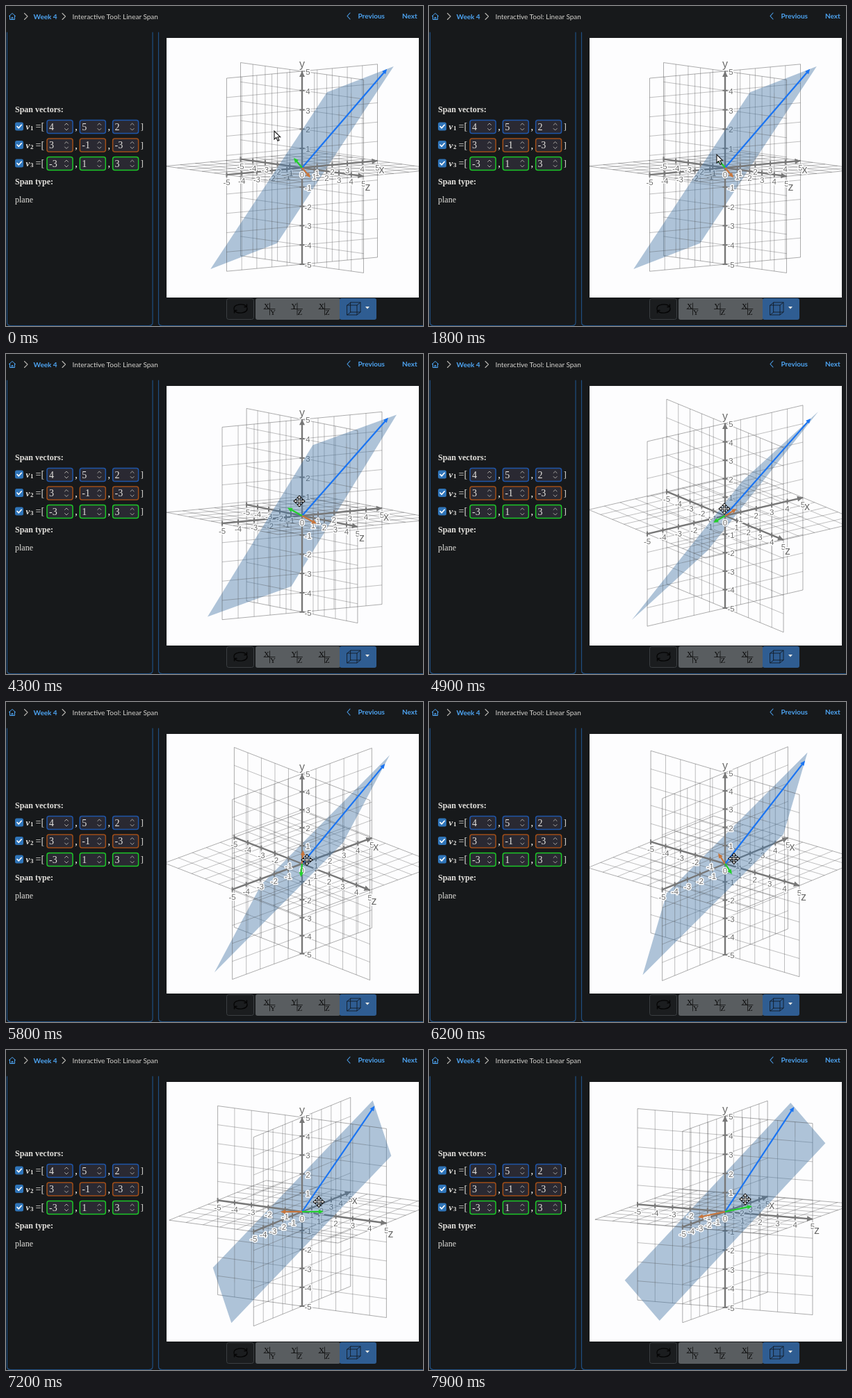
An HTML page with a canvas that plays this animation: 600x461 px, repeating every 8 s.

```html
<!DOCTYPE html>
<html lang="en">
<head>
<meta charset="utf-8">
<title>Linear Span</title>
<style>
  html, body { margin: 0; width: 100%; height: 100%; overflow: hidden; background: #17191b; }
  svg, canvas { position: absolute; left: 0; top: 0; width: 600px; height: 461px; }
  .nav { font: 10px Lato, sans-serif; fill: #d4d2ce; }
  .link { fill: #4da3f0; }
  .bold { font-weight: 700; }
  .serif { font: 12px "Liberation Serif", serif; fill: #e4e2de; }
  .head { font-weight: 700; }
  .var { font-style: italic; font-weight: 700; font-size: 13px; }
  .icon { font: 11px "Liberation Serif", serif; fill: #0c0c0c; }
  .line { fill: none; stroke-linecap: round; stroke-linejoin: round; }
</style>
</head>
<body>
<svg viewBox="0 0 600 461">
  <g class="line" stroke="#1f4f82" stroke-width="1.2">
    <path d="M1.500 38V455.500q0 5 5 5H206q5 0 5-5V38"/>
    <path d="M219.500 38V455.500q0 5 5 5H600"/>
  </g>
  <path class="line" stroke="#4da3f0" d="M4.500 14.500L9 10.500l4.500 4M5.500 14v5.500h7V14M8 19.500v-3h2v3"/>
  <g class="line" stroke-width="1.1">
    <path stroke="#b5b3af" d="M26.500 10.500l4.500 4.500-4.500 4.500M81 10.500l4.500 4.500-4.500 4.500"/>
    <path stroke="#4da3f0" d="M495 10l-4 4.500 4 4.500"/>
  </g>
  <text class="nav link bold" x="39.500" y="18.500">Week 4</text>
  <text class="nav" x="95.500" y="18.500">Interactive Tool: Linear Span</text>
  <text class="nav link bold" x="506.500" y="18">Previous</text>
  <text class="nav link bold" x="570" y="18">Next</text>

  <text class="serif head" x="13" y="153">Span vectors:</text>
  <text class="serif head" x="13" y="257">Span type:</text>
  <text class="serif" x="13" y="283">plane</text>
  <g id="rows"></g>

  <rect x="317.500" y="421.500" width="39" height="30" rx="3" fill="#1b1d1f" stroke="#3b3f42"/>
  <g class="line" stroke="#050505" stroke-width="1.4">
    <path d="M328 437c-1-8 14-9 18-4M347 435c1 8-14 9-18 4M346.500 430v3.500h-3.500M328.500 442v-3.500h3.500"/>
  </g>
  <rect x="359" y="421" width="122" height="31" rx="3" fill="#595d60"/>
  <g id="views"></g>
  <rect x="480" y="421" width="53" height="31" rx="3" fill="#2f5d92"/>
  <path class="line" stroke="#131b26" stroke-width=".9" d="M491 431h14v14h-14zM496 427h14v14h-14zM491 431l5-4M505 431l5-4M491 445l5-4M505 445l5-4"/>
  <path fill="#e8e6e3" d="M517 433h6l-3 3.500z"/>
</svg>
<canvas id="stage" width="600" height="461"></canvas>

<script>
const LOOP = 8000, STEP = 100;
const SCALE = 140 / 5, CX = 426, CY = 233;
const VECTORS = [
  { v: [4, 5, 2], color: '#1a74f2', edge: '#1f55a8' },
  { v: [3, -1, -3], color: '#c8763c', edge: '#a04e18' },
  { v: [-3, 1, 3], color: '#22cf2c', edge: '#1cc728' }
];
const NORMAL = [-13, 18, -19];
const GRID = 'rgba(70,70,70,.34)', GRID_EDGE = 'rgba(70,70,70,.44)', AXIS = '#777';

// time, azimuth, elevation in degrees
const POSE = [
  [0, 39.2, 6.55], [3850, 39.2, 6.55], [4300, 34.8, 7.95], [4900, 36.9, 18.1],
  [5800, 44.2, 22.3], [6700, 56.6, 16.4], [7900, 64.1, 10]
];
// time, x, y of the pointer
const POINTER = [
  [0, 386, 180], [900, 398, 196], [1800, 414, 214], [2300, 416, 236], [2700, 418, 246],
  [2800, 414, 232], [2900, 414, 232], [3200, 444, 236], [3500, 434, 191], [3800, 426.5, 210.5],
  [4300, 422, 212], [4900, 425, 223], [5800, 433, 227.5], [6700, 446, 221.5], [7900, 455, 215]
];
const DRAG_START = 3850;

// Monotone cubic interpolation of column k
function sample(keys, t, k) {
  let i = 0;
  while (i < keys.length - 2 && t >= keys[i + 1][0]) i++;
  const slope = j => j < 0 || j > keys.length - 2 ? 0
    : (keys[j + 1][k] - keys[j][k]) / (keys[j + 1][0] - keys[j][0]);
  const tangent = j => {
    const a = slope(j - 1), b = slope(j);
    if (j === keys.length - 1) return a;
    return a * b > 0 ? 2 * a * b / (a + b) : 0;
  };
  const h = keys[i + 1][0] - keys[i][0];
  const u = Math.min(1, (t - keys[i][0]) / h), w = 1 - u;
  return keys[i][k] * w * w * (1 + 2 * u) + keys[i + 1][k] * u * u * (3 - 2 * u)
    + h * u * w * (w * tangent(i) - u * tangent(i + 1));
}

// Side panel rows and view buttons
document.getElementById('rows').innerHTML = VECTORS.map(({ v, edge }, r) => {
  const y = 174 + r * 26.5;
  const boxes = v.map((n, i) => {
    const x = 59 + i * 47.3;
    return `<rect x="${x}" y="${y - 9.5}" width="37" height="19" rx="3" fill="#2a2932" stroke="${edge}" stroke-width="1.5"/>
      <text class="serif" x="${x + 3}" y="${y + 4.5}" style="font-size:14px">${n}</text>
      <path class="line" stroke="#aaa8a4" d="M${x + 25.5} ${y - 2.5}l2.500-2.500 2.500 2.500m-5 5l2.500 2.500 2.500-2.500"/>
      <text class="serif head" x="${x + 40.5}" y="${y + 5}">${i < 2 ? ',' : ''}</text>`;
  }).join('');
  return `<rect x="13" y="${y - 6.5}" width="12" height="12" rx="2.500" fill="#2f74b8"/>
    <path class="line" stroke="#fff" stroke-width="1.7" d="M16 ${y - .5}l2.300 2.300 4-4.500"/>
    <text class="serif var" x="28.500" y="${y + 4}">v</text>
    <text class="serif head" x="35" y="${y + 5}" style="font-size:9px">${r + 1}</text>
    <text class="serif" x="42.500" y="${y + 4}" style="font-size:14px">=[</text>${boxes}
    <text class="serif" x="193.500" y="${y + 4}" style="font-size:13px">]</text>`;
}).join('');
document.getElementById('views').innerHTML = ['XY', 'YZ', 'XZ'].map((s, i) => {
  const x = 371 + i * 39.5;
  return `<text class="icon" x="${x}" y="436">${s[0]}</text><text class="icon" x="${x + 9}" y="445">${s[1]}</text>
    <path class="line" stroke="#111" stroke-width=".8" d="M${x} 436.500h16M${x + 8.5} 428v17"/>`;
}).join('');

const ctx = document.getElementById('stage').getContext('2d');
let ca, sa, ce, se, facing;

function setView(a, e) {
  a *= Math.PI / 180;
  e *= Math.PI / 180;
  [ca, sa, ce, se] = [Math.cos(a), Math.sin(a), Math.cos(e), Math.sin(e)];
  facing = Math.sign(dot(NORMAL, [-sa * ce, se, ca * ce])) || 1;
}
const dot = (p, q) => p[0] * q[0] + p[1] * q[1] + p[2] * q[2];
const side = p => dot(NORMAL, p) * facing;
const project = ([x, y, z]) => [
  CX + SCALE * (x * ca + z * sa),
  CY + SCALE * ((z * ca - x * sa) * se - y * ce)
];
const point = (axis, n) => [0, 1, 2].map(i => i === axis ? n : 0);

function line(a, b, color, width) {
  ctx.strokeStyle = color;
  ctx.lineWidth = width;
  ctx.beginPath();
  ctx.moveTo(...a);
  ctx.lineTo(...b);
  ctx.stroke();
}

// Part of the segment in front of (dir 1) or behind (dir -1) the span
function segment(p, q, dir, color, width) {
  const f = side(p) * dir, g = side(q) * dir;
  if (f < 0 && g < 0 || (dir < 0 && f === 0 && g === 0)) return;
  const cut = p.map((c, i) => c + (q[i] - c) * f / (f - g));
  line(project(f < 0 ? cut : p), project(g < 0 ? cut : q), color, width);
}

function head(from, to, color, len, half) {
  const dx = to[0] - from[0], dy = to[1] - from[1], d = Math.hypot(dx, dy) || 1;
  const ux = dx / d, uy = dy / d, bx = to[0] - ux * len, by = to[1] - uy * len;
  ctx.fillStyle = color;
  ctx.beginPath();
  ctx.moveTo(...to);
  ctx.lineTo(bx - uy * half, by + ux * half);
  ctx.lineTo(bx + uy * half, by - ux * half);
  ctx.fill();
}

function label(text, x, y, size = 11.5) {
  ctx.font = `${size}px "Liberation Sans", Arial, sans-serif`;
  ctx.strokeStyle = '#fff';
  ctx.lineWidth = 3;
  ctx.strokeText(text, x, y);
  ctx.fillStyle = '#6c6c6c';
  ctx.fillText(text, x, y);
}

function drawGrids(dir) {
  for (const [u, v] of [[0, 1], [1, 2], [0, 2]]) {
    for (let n = -5; n <= 5; n++) {
      for (const [i, j] of [[u, v], [v, u]]) {
        const p = point(i, n), q = point(i, n);
        p[j] = -5;
        q[j] = 5;
        segment(p, q, dir, Math.abs(n) === 5 ? GRID_EDGE : GRID, 1);
      }
    }
  }
}

function drawAxes(dir) {
  const shown = p => side(p) * dir > 0;
  for (let k = 0; k < 3; k++) {
    segment(point(k, -5), point(k, 5), dir, AXIS, 2.4);
    for (let n = -5; n < 5; n++) {
      const p = point(k, n);
      if (!n || !shown(p)) continue;
      const [x, y] = project(p);
      if (k === 1) line([x - 3.5, y], [x + 3.5, y], AXIS, 2);
      else line([x, y - 3.5], [x, y + 3.5], AXIS, 2);
    }
    if (shown(point(k, 5))) head([CX, CY], project(point(k, 5)), AXIS, 8, 4);
  }
  for (let k = 0; k < 3; k++) {
    for (let n = -5; n <= 5; n++) {
      const p = point(k, n);
      if (!n || !shown(p)) continue;
      const [x, y] = project(p);
      if (k === 1) label(n, x + 8.5, y + 5);
      else label(n, x, y + 14.5);
    }
    const end = point(k, 5);
    if (!shown(end)) continue;
    const [x, y] = project(end);
    if (k === 1) label('y', x, y - 4.5, 16);
    else label('xyz'[k], x + 6, y + (k ? 21 : 18), 16);
  }
  if (dir > 0) label('0', CX, CY + 14);
}

function drawSpan() {
  const corner = (x, y) => project([x, y, (18 * y - 13 * x) / 19]);
  ctx.fillStyle = 'rgba(64,116,163,.42)';
  ctx.beginPath();
  for (const [x, y] of [[5, 5], [-5, 5], [-5, -5], [5, -5]]) ctx.lineTo(...corner(x, y));
  ctx.fill();
}

function drawVectors() {
  for (const { v, color } of VECTORS) {
    const tip = project(v), long = Math.hypot(tip[0] - CX, tip[1] - CY);
    const len = Math.min(7, long);
    const k = 1 - len * .7 / long;
    line([CX, CY], [CX + (tip[0] - CX) * k, CY + (tip[1] - CY) * k], color, 2.2);
    head([CX, CY], tip, color, len, 3.2);
  }
}

const ARROW = new Path2D('M0 0V12L2.800 9.500 5 14.300 7 13.400 4.900 8.800H8.700Z');
const MOVE = new Path2D('M0-8L3-4.500H1V-1H4.500V-3L8 0 4.500 3V1H1V4.500H3L0 8-3 4.500H-1V1H-4.500V3L-8 0-4.500-3V-1H-1V-4.500H-3Z');

function drawPointer(t) {
  ctx.save();
  ctx.translate(sample(POINTER, t, 1), sample(POINTER, t, 2));
  const shape = t < DRAG_START ? ARROW : MOVE;
  ctx.fillStyle = '#fff';
  ctx.fill(shape);
  ctx.lineWidth = 1.1;
  ctx.strokeStyle = '#151515';
  ctx.stroke(shape);
  ctx.restore();
}

function draw(t) {
  setView(sample(POSE, t, 1), sample(POSE, t, 2));
  ctx.clearRect(0, 0, 600, 461);
  ctx.save();
  ctx.beginPath();
  ctx.rect(231, 46, 363, 374);
  ctx.clip();
  ctx.fillStyle = '#fdfdfe';
  ctx.fillRect(231, 46, 363, 374);
  ctx.textAlign = 'center';
  ctx.lineJoin = 'round';
  drawGrids(-1);
  drawAxes(-1);
  drawSpan();
  drawGrids(1);
  drawAxes(1);
  drawVectors();
  ctx.restore();
  drawPointer(t);
}

function tick() {
  draw(Math.floor(performance.now() % LOOP / STEP) * STEP);
  requestAnimationFrame(tick);
}
tick();
</script>
</body>
</html>
```
